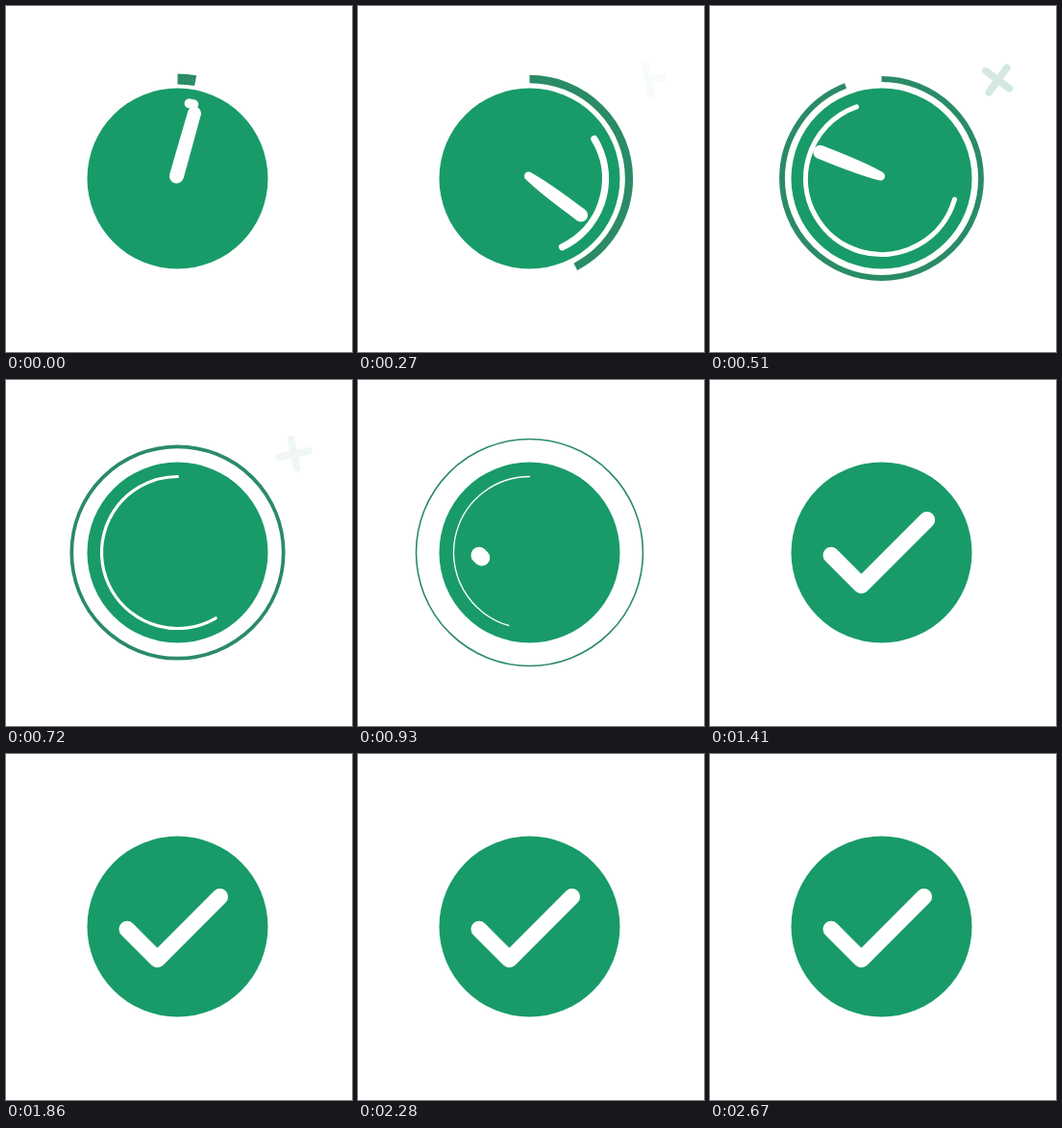
An HTML page with a canvas for the animation above (2.7 s loop, 360 px wide and 360 px high).

```html
<!DOCTYPE html>
<html lang="en">
<head>
<meta charset="utf-8">
<title>Timer to check</title>
<style>
html, body { margin: 0; width: 100%; height: 100%; overflow: hidden; background: #fff; }
canvas { display: block; width: 360px; height: 360px; }
</style>
</head>
<body>
<canvas id="stage"></canvas>
<script>
const LOOP = 2700, CX = 178.5, CY = 179.5;
const GREEN = '#189b69', RIM = '#2a8b66', WHITE = '#fff';
const canvas = document.getElementById('stage');
const ctx = canvas.getContext('2d');
const dpr = window.devicePixelRatio || 1;
canvas.width = canvas.height = 360 * dpr;

const rad = deg => deg * Math.PI / 180;
// Progress from 0 to 1 between two times.
const span = (t, from, to) => Math.min(1, Math.max(0, (t - from) / (to - from)));
const smooth = u => u * u * (3 - 2 * u);
// Angle that starts at a given speed and accelerates, up to a full turn.
const spin = (t, start, speed, gain) => Math.min(360, start + speed * t + gain * t * t);

function disc(x, y, r, color) {
  ctx.fillStyle = color;
  ctx.beginPath();
  ctx.arc(x, y, r, 0, 2 * Math.PI);
  ctx.fill();
}

function stroke(color, width, cap) {
  ctx.strokeStyle = color;
  ctx.lineWidth = width;
  ctx.lineCap = cap;
  ctx.lineJoin = 'round';
  ctx.stroke();
}

// Clockwise arc, angles in degrees from twelve o'clock.
function arc(r, from, to, width, color, cap) {
  if (width <= 0) return;
  ctx.beginPath();
  ctx.arc(CX, CY, r, rad(from - 90), rad(to - 90));
  stroke(color, width, cap);
}

function rim(t) {
  const radius = 103.5 + 20 * span(t, 540, 1080);
  arc(radius, 0, spin(t, 10, 0.393, 0.00049), 11 - 0.0101 * t, RIM, 'butt');
}

function innerArc(t) {
  const tail = spin(t, 8.5, 0.178, 0.000025);
  const head = spin(t, 12, 0.393, 0.00049);
  arc(79, tail, head, 9.7 - 0.009 * t, WHITE, 'round');
}

// A bar whose pivot end narrows as it speeds up.
function hand(t) {
  const size = 1 - span(t, 570, 720);
  if (!size) return;
  const base = 7.5 - 3 * span(t, 0, 270);
  ctx.save();
  ctx.translate(CX - 1, CY - 2.5);
  ctx.rotate(rad(spin(t, 15.5, 0.2625, 0.000544)));
  ctx.scale(size, size);
  disc(0, 0, base, WHITE);
  disc(0, -68, 7, WHITE);
  ctx.beginPath();
  ctx.moveTo(-base, 0);
  ctx.quadraticCurveTo(-7.5, -20, -7, -68);
  ctx.lineTo(7, -68);
  ctx.quadraticCurveTo(7.5, -20, base, 0);
  ctx.fill();
  ctx.restore();
}

function cross(t) {
  const alpha = 0.2 * span(t, 240, 420) * (1 - span(t, 570, 810));
  if (!alpha) return;
  ctx.save();
  ctx.globalAlpha = alpha;
  ctx.translate(302 - 2.5 * span(t, 270, 510), 77);
  ctx.rotate(rad(0.2 * t - 66));
  ctx.beginPath();
  ctx.moveTo(-16 * span(t, 270, 390), 0);
  ctx.lineTo(15, 0);
  ctx.moveTo(0, -16);
  ctx.lineTo(0, 16);
  stroke(RIM, 7.5, 'round');
  ctx.restore();
}

// Draws on past its final length, then settles back.
function check(t) {
  const length = 141 * smooth(span(t, 885, 1350)) - 4.4 * smooth(span(t, 1400, 1620));
  if (length <= 0) return;
  const x = 126, y = 182.2, leg = 44.5, d = Math.SQRT1_2;
  const down = Math.min(length, leg) * d;
  const up = Math.max(0, length - leg) * d;
  ctx.beginPath();
  ctx.moveTo(x, y);
  ctx.lineTo(x + down, y + down);
  if (up) ctx.lineTo(x + down + up, y + down - up);
  stroke(WHITE, 17, 'round');
}

function draw(t) {
  ctx.setTransform(dpr, 0, 0, dpr, 0, 0);
  ctx.fillStyle = WHITE;
  ctx.fillRect(0, 0, 360, 360);
  rim(t);
  disc(CX, CY, 94, GREEN);
  innerArc(t);
  hand(t);
  check(t);
  cross(t);
}

const start = performance.now();
function tick() {
  draw((performance.now() - start) % LOOP);
  requestAnimationFrame(tick);
}
draw(0);
requestAnimationFrame(tick);
</script>
</body>
</html>
```
